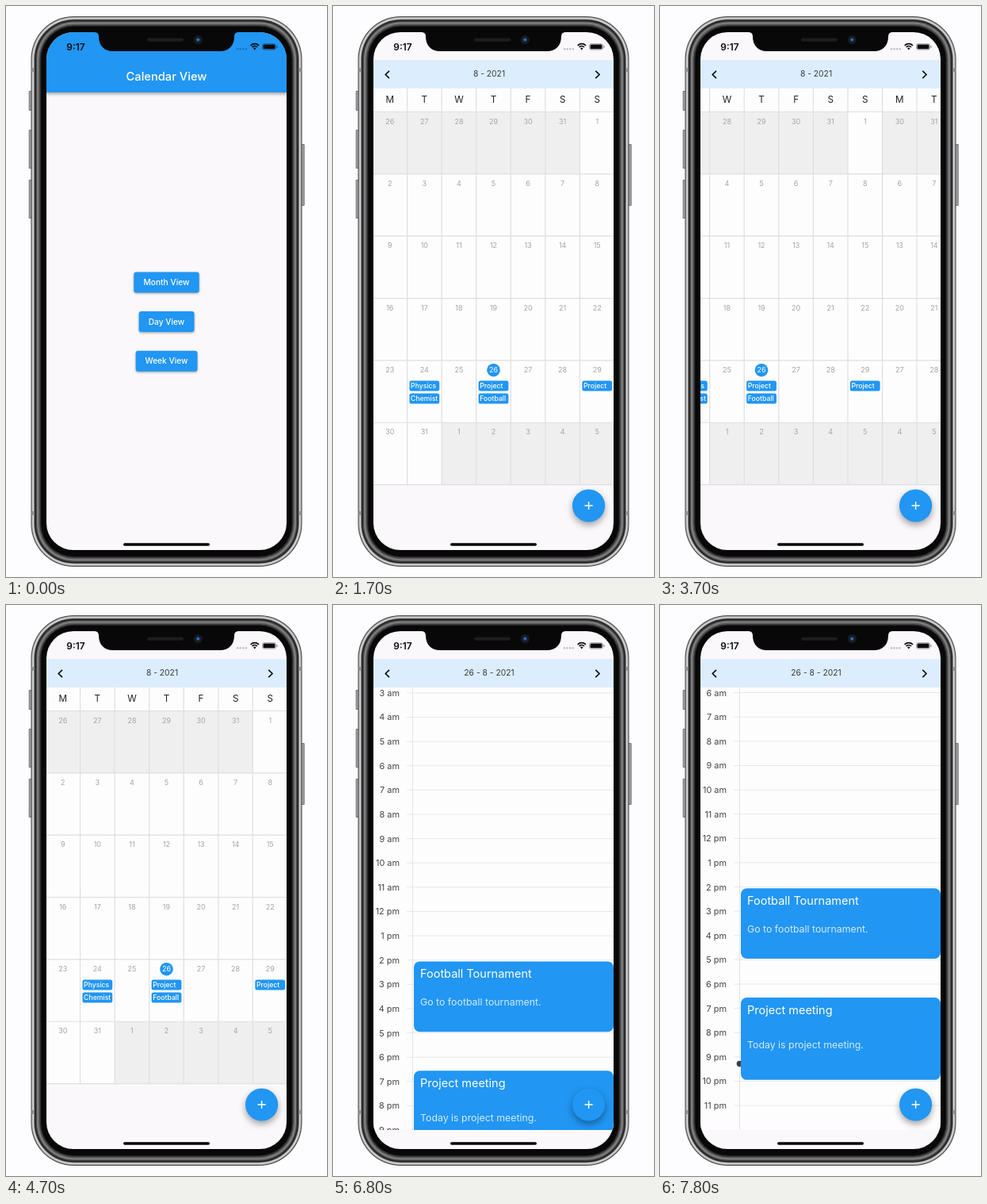
Write an HTML page with a canvas that moves like this. It is 405 by 720 pixels and loops after 8 s.

```html
<!DOCTYPE html>
<html lang="en">
<head>
<meta charset="utf-8">
<title>Calendar View</title>
<style>
  html, body { margin: 0; width: 100%; height: 100%; overflow: hidden; background: #fdfcfe; }
  canvas { display: block; width: 405px; height: 720px; }
</style>
</head>
<body>
<canvas id="stage"></canvas>
<script>
const canvas = document.getElementById('stage');
const c = canvas.getContext('2d');
const ratio = window.devicePixelRatio || 1;
canvas.width = 405 * ratio;
canvas.height = 720 * ratio;

const BLUE = '#2196f3', PAPER = '#faf8fb', WHITE = '#fefdfe', LINE = '#dfdee0', INK = '#0b0b0d';
const LEFT = 50, WIDTH = 305, COL = WIDTH / 7, ROW = 78.35, GRID_TOP = 133.5;
const HOUR = 30.62, DAY_TOP = 104, DAY_BOTTOM = 662;
const LOOP = 8000, STEP = 100;

function rect(x, y, w, h, color) {
  c.fillStyle = color;
  c.fillRect(x, y, w, h);
}

function round(x, y, w, h, r, color) {
  c.beginPath();
  c.roundRect(x, y, w, h, r);
  c.fillStyle = color;
  c.fill();
}

function circle(x, y, r, color) {
  c.beginPath();
  c.arc(x, y, r, 0, 7);
  c.fillStyle = color;
  c.fill();
}

function stroke(points, color, width) {
  c.beginPath();
  points.forEach(([x, y]) => c.lineTo(x, y));
  c.strokeStyle = color;
  c.lineWidth = width;
  c.stroke();
}

function text(str, x, y, size, color, align = 'center', weight = 400) {
  c.font = `${weight} ${size}px Inter, sans-serif`;
  c.textAlign = align;
  c.textBaseline = 'middle';
  c.fillStyle = color;
  c.fillText(str, x, y);
}

function saved(draw) {
  c.save();
  draw();
  c.restore();
}

function clipped(x, y, w, h, r, draw) {
  saved(() => {
    c.beginPath();
    c.roundRect(x, y, w, h, r);
    c.clip();
    draw();
  });
}

function shadowed(blur, dy, alpha, draw) {
  saved(() => {
    c.shadowColor = `rgba(0,0,0,${alpha})`;
    c.shadowBlur = blur * ratio;
    c.shadowOffsetY = dy * ratio;
    draw();
  });
}

// Motion
const clamp = x => Math.min(1, Math.max(0, x));
const smooth = x => (x = clamp(x), x * x * (3 - 2 * x));
const push = ms => 1 - (1 - clamp(ms / 450)) ** 4;

function spring(ms) {
  const a = Math.max(0, ms) * 0.0109;
  return 1 - (1 + a) * Math.exp(-a);
}

// Flick down the day, run past the end and bounce back.
function dayScroll(ms) {
  const rise = [0, 20, 85, 150, 186, 191];
  const i = Math.max(0, ms / STEP);
  if (i >= 5) return 177 + 14 * Math.exp(-(i - 5) * 0.66);
  const k = Math.floor(i);
  return rise[k] + (rise[k + 1] - rise[k]) * (i - k);
}

// Screens
function button(label, x, y, w, touch) {
  shadowed(3, 1.2, 0.35, () => round(x, y, w, 26, 3, BLUE));
  if (touch >= 0 && touch < 300) {
    clipped(x, y, w, 26, 3, () =>
      circle(201, y + 13, 13 + touch / 12, `rgba(255,255,255,${0.24 - touch / 1500})`));
  }
  text(label, 202.5, y + 13.4, 10.2, '#fff', 'center', 500);
}

function home(t) {
  rect(LEFT, 30, WIDTH, 660, PAPER);
  shadowed(4, 1.5, 0.35, () => rect(LEFT, 30, WIDTH, 79, BLUE));
  text('Calendar View', 202.5, 89.3, 14.7, '#fff', 'center', 500);
  button('Month View', 161.3, 335.4, 82.4, t - 500);
  button('Day View', 167.7, 385.1, 69.8, t - 6000);
  button('Week View', 163.7, 434.7, 77.8, -1);
}

function header(title) {
  rect(LEFT, 68, WIDTH, 36, '#dceefe');
  text(title, 197, 86.2, 10.3, '#3a3a3a');
  stroke([[71, 81.8], [66.3, 86.5], [71, 91.2]], '#111', 1.7);
  stroke([[331.3, 81.8], [336, 86.5], [331.3, 91.2]], '#111', 1.7);
}

function addButton() {
  shadowed(8, 4, 0.36, () => circle(322.6, 630, 20.6, BLUE));
  stroke([[317.5, 630], [327.7, 630]], '#fff', 1.4);
  stroke([[322.6, 624.9], [322.6, 635.1]], '#fff', 1.4);
}

function chip(label, col, slot) {
  const x = LEFT + col * COL + 2.9, y = 472.5 + slot * 16;
  round(x, y, COL - 5.8, 13.1, 2.5, BLUE);
  text(label, x + 1.6, y + 6.7, 8.7, '#fff', 'left', 500);
}

function monthGrid(dx, lead, days, today) {
  saved(() => {
    c.translate(dx, 0);
    rect(LEFT, 104, WIDTH, GRID_TOP - 104, WHITE);
    [...'MTWTFSS'].forEach((d, i) => text(d, LEFT + (i + 0.5) * COL, 118.9, 11.7, '#222'));
    for (let i = 0; i < 42; i++) {
      const x = LEFT + (i % 7) * COL, y = GRID_TOP + Math.floor(i / 7) * ROW;
      const n = i - lead + 1, inside = n > 0 && n <= days;
      const label = n < 1 ? n + 31 : inside ? n : n - days;
      rect(x, y, COL, ROW, inside ? WHITE : '#f0eff0');
      if (inside && n === today) circle(x + COL / 2, y + 12.3, 8.3, BLUE);
      text(label, x + COL / 2, y + 12.4, 9, inside && n === today ? '#fff' : '#a5a4a6');
    }
    for (let i = 0; i <= 7; i++) {
      const x = LEFT + i * COL, y = GRID_TOP + i * ROW;
      stroke([[x, 104], [x, GRID_TOP + 6 * ROW]], LINE, 1.2);
      if (i < 7) stroke([[LEFT, y], [LEFT + WIDTH, y]], LINE, 1.2);
    }
    if (today) {
      chip('Physics', 1, 0);
      chip('Chemist', 1, 1);
      chip('Project', 3, 0);
      chip('Football', 3, 1);
      chip('Project', 6, 0);
    }
  });
}

function month(t) {
  const turn = spring(t - 2150) - spring(t - 3450);
  rect(LEFT, 30, WIDTH, 660, PAPER);
  clipped(LEFT, 104, WIDTH, 501, 0, () => {
    monthGrid(-WIDTH * turn, 6, 31, 26);
    monthGrid(WIDTH * (1 - turn), 2, 30, 0);
  });
  header(`${turn > 0.5 ? 9 : 8} - 2021`);
  addButton();
}

function dayEvent(title, note, y, h, noteY) {
  round(102, y, 252, h, 7.5, BLUE);
  text(title, 110, y + 16.2, 14.5, '#fff', 'left');
  text(note, 110, y + noteY, 12.35, 'rgba(255,255,255,.8)', 'left');
}

function day(t) {
  rect(LEFT, 30, WIDTH, 660, PAPER);
  clipped(LEFT, DAY_TOP, WIDTH, DAY_BOTTOM - DAY_TOP, 0, () => {
    rect(LEFT, DAY_TOP, WIDTH, DAY_BOTTOM - DAY_TOP, WHITE);
    c.translate(0, DAY_TOP - dayScroll(t - 6600));
    for (let h = 1; h < 24; h++) {
      const y = h * HOUR;
      stroke([[93, y], [355, y]], '#e8e7e9', 1);
      text(`${h % 12 || 12} ${h < 12 ? 'am' : 'pm'}`, 84, y + 0.7, 10.9, '#444', 'right');
    }
    stroke([[100.5, 0], [100.5, 24 * HOUR]], '#e3e2e4', 1);
    circle(100.4, 651.7, 3.7, '#3c4045');
    dayEvent('Football Tournament', 'Go to football tournament.', 430.4, 88.8, 52);
    dayEvent('Project meeting', 'Today is project meeting.', 568.2, 103.8, 60);
  });
  header('26 - 8 - 2021');
  addButton();
}

// Device
function body() {
  for (const [y, h] of [[107, 25], [156, 49], [219, 49]]) {
    round(28.7, y, 4, h, 1, '#77767a');
    rect(29.8, y + 1, 2, h - 2, '#a9a8ab');
  }
  round(372.5, 174, 4.2, 78, 1, '#77767a');
  rect(373.4, 175, 2, 76, '#a9a8ab');
  const layers = [[0, '#484848'], [1, '#aaa'], [2, '#d6d6d6'], [3.6, '#777'], [4.6, '#222'],
    [6.2, '#4c4c4c'], [7.6, '#808080'], [9.6, '#5a5a5a'], [11.2, '#2c2c2c'], [12.8, '#080808']];
  for (const [d, color] of layers) round(31.5 + d, 13 + d, 342 - 2 * d, 694 - 2 * d, 54 - d, color);
  for (const x of [32.2, 369.3]) for (const y of [78, 637]) rect(x, y, 3.5, 5, '#8f8f8f');
}

function statusBar() {
  text('9:17', 88, 52.2, 11.9, INK, 'center', 600);
  for (let i = 0; i < 4; i++) circle(292 + i * 3.6, 54.2, 1.2, 'rgba(0,0,0,.24)');
  c.lineWidth = 1.7;
  c.strokeStyle = INK;
  for (const r of [4.6, 7.5]) {
    c.beginPath();
    c.arc(313.8, 55.2, r, -2.33, -0.81);
    c.stroke();
  }
  c.beginPath();
  c.moveTo(313.8, 55.4);
  c.arc(313.8, 55.2, 2.6, -2.33, -0.81);
  c.fillStyle = INK;
  c.fill();
  c.beginPath();
  c.roundRect(323.5, 47.6, 17, 7.6, 2.2);
  c.lineWidth = 0.8;
  c.strokeStyle = 'rgba(0,0,0,.4)';
  c.stroke();
  round(324.5, 48.6, 15, 5.6, 1.3, INK);
  round(341.4, 50, 1.2, 3, 0.6, 'rgba(0,0,0,.4)');
}

function notch() {
  c.beginPath();
  c.moveTo(112, 32);
  c.lineTo(112, 33);
  c.quadraticCurveTo(117, 33.2, 117, 38.5);
  c.bezierCurveTo(117, 50, 124, 57, 135, 57);
  c.lineTo(270, 57);
  c.bezierCurveTo(281, 57, 288, 50, 288, 38.5);
  c.quadraticCurveTo(288, 33.2, 293, 33);
  c.lineTo(293, 32);
  c.fillStyle = '#080808';
  c.fill();
  round(178, 40.4, 46, 4.4, 2.2, '#1d1d1f');
  circle(242.3, 42.6, 5.6, '#171a24');
  circle(242.3, 42.6, 2.1, '#2b6cb0');
}

function screens(t) {
  const monthIn = t < 4800 ? push(t - 550) : 1 - smooth((t - 4800) / 900);
  const dayIn = push(t - 6050);
  const shown = Math.max(monthIn, dayIn);
  const shift = (dx, draw) => saved(() => {
    c.translate(dx, 0);
    draw(t);
  });
  if (shown < 1) shift(-WIDTH / 3 * shown, home);
  if (shown > 0) {
    const x = WIDTH * (1 - shown);
    const shade = c.createLinearGradient(LEFT + x - 14, 0, LEFT + x, 0);
    shade.addColorStop(0, 'rgba(0,0,0,0)');
    shade.addColorStop(1, 'rgba(0,0,0,.1)');
    rect(LEFT + x - 14, 30, 14, 660, shade);
    shift(x, t < 6000 ? month : day);
  }
}

function render(t) {
  c.setTransform(ratio, 0, 0, ratio, 0, 0);
  rect(0, 0, 405, 720, '#fdfcfe');
  body();
  clipped(51, 33, 303, 653, 34, () => {
    screens(t);
    statusBar();
    notch();
    round(148, 677.3, 109, 3.4, 1.7, '#050505');
  });
}

const start = performance.now();
function frame() {
  const t = (performance.now() - start) % LOOP;
  render(Math.floor(t / STEP) * STEP);
  requestAnimationFrame(frame);
}
frame();
</script>
</body>
</html>
```
